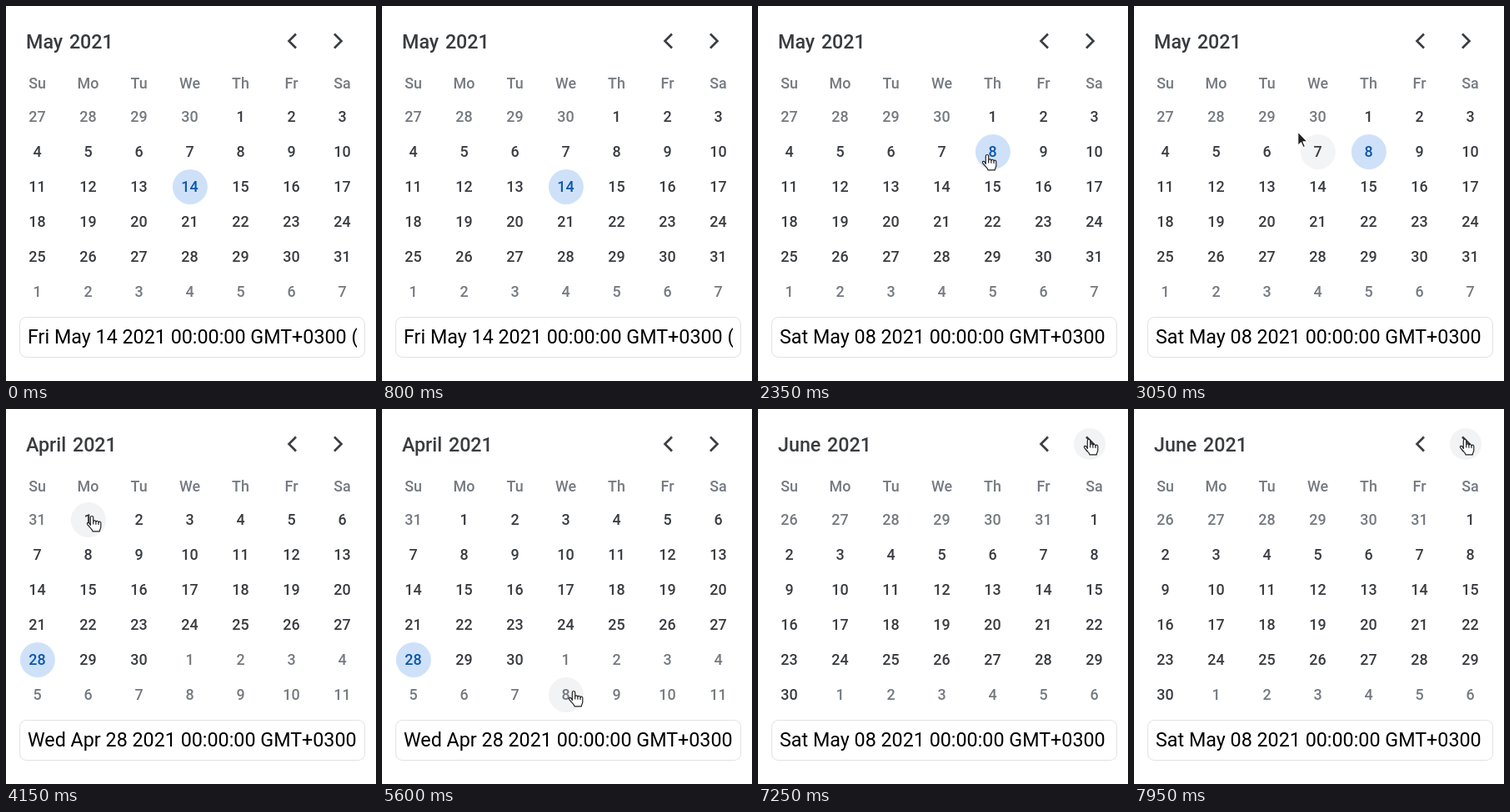
Write an HTML page with a canvas that moves like this. It is 444 px wide and 450 px high and loops after 8 s.

```html
<!DOCTYPE html>
<html lang="en">
<head>
<meta charset="utf-8">
<title>Date picker</title>
<style>
html, body { margin: 0; width: 100%; height: 100%; overflow: hidden; background: #fff; }
canvas { display: block; }
</style>
</head>
<body>
<canvas id="stage" width="444" height="450"></canvas>
<script>
const ctx = document.getElementById('stage').getContext('2d');
const LOOP = 8000, FADE = 200;
const DARK = '#393c40', GRAY = '#757a80';
const WEEKDAYS = ['Su', 'Mo', 'Tu', 'We', 'Th', 'Fr', 'Sa'];

const MONTHS = {
  April: { lead: 1, previous: 31, days: 30 },
  May: { lead: 4, previous: 30, days: 31 },
  June: { lead: 6, previous: 31, days: 30 },
};

// Each state holds from its start time until the next one.
const STATES = [
  { at: 0, month: 'May', selected: 14, value: 'Fri May 14 2021 00:00:00 GMT+0300 (' },
  { at: 1950, month: 'May', selected: 8, value: 'Sat May 08 2021 00:00:00 GMT+0300' },
  { at: 3900, month: 'April', selected: 28, value: 'Wed Apr 28 2021 00:00:00 GMT+0300' },
  { at: 5800, month: 'May', selected: 8, value: 'Sat May 08 2021 00:00:00 GMT+0300' },
  { at: 7250, month: 'June', selected: 0, value: 'Sat May 08 2021 00:00:00 GMT+0300' },
];

// Pointer path: time, x, y
const PATH = [
  [1000, 300, 419], [1250, 283, 237], [1330, 279, 196], [1450, 275, 179],
  [2600, 275, 179], [2800, 241, 170], [3030, 203, 156], [3050, 197, 151],
  [3250, 135, 135], [3450, 103, 129], [4450, 103, 129], [4800, 150, 215],
  [5150, 215, 320], [5300, 230, 339], [5950, 230, 339], [6080, 270, 240],
  [6240, 345, 108], [6450, 377, 55], [6650, 397, 37], [8000, 397, 37],
];

const HAND = new Path2D('M-1.7 10.5V1.2a1.7 1.7 0 0 1 3.4 0V6.3a1.6 1.6 0 0 1 3.2.2a1.6 1.6 0 0 1 3.1.5a1.5 1.5 0 0 1 2.8 1V12.5c0 2-1.5 3-1.5 5.3H1c0-2.3-3.5-4.3-6.2-8.2c-1.3-2 .8-3 2.1-1.6z');
const FINGERS = new Path2D('M1.7 6.3V9.5M4.9 6.5V9.7M8 7V10');
const ARROW = new Path2D('M0 0V16.5L3.8 13L6.3 18.8L8.8 17.7L6.3 12H11.5z');

const cells = Array.from({ length: 42 }, (_, i) => ({
  x: 37.5 + 61 * (i % 7), y: 133 + 42 * Math.floor(i / 7), r: 21,
}));
const buttons = [{ x: 344, y: 42, r: 19, dir: -1 }, { x: 398, y: 42, r: 19, dir: 1 }];
const hotspots = [...cells, ...buttons];

function pointerAt(t) {
  const i = PATH.findIndex(p => p[0] > t);
  if (i < 1) return null;
  const [t0, x0, y0] = PATH[i - 1], [t1, x1, y1] = PATH[i];
  const k = (t - t0) / (t1 - t0);
  return { x: x0 + (x1 - x0) * k, y: y0 + (y1 - y0) * k };
}

const inside = (p, spot) => p && Math.abs(p.x - spot.x) < spot.r && Math.abs(p.y - spot.y) < spot.r;

// Fading hover strength: share of the recent past spent over the spot.
function hoverLevel(recent, spot) {
  return recent.filter(p => inside(p, spot)).length / recent.length;
}

function disc({ x, y, r }, color, alpha = 1) {
  ctx.globalAlpha = alpha;
  ctx.fillStyle = color;
  ctx.beginPath();
  ctx.arc(x, y, r, 0, 7);
  ctx.fill();
  ctx.globalAlpha = 1;
}

function label(text, x, y, size, color, weight = 500, align = 'center') {
  ctx.font = `${weight} ${size}px Roboto, sans-serif`;
  ctx.textAlign = align;
  ctx.fillStyle = color;
  ctx.fillText(text, x, y);
}

function drawHeader(month, recent) {
  label(month, 24, 50.5, 23.3, DARK, 500, 'left');
  label('2021', 24 + ctx.measureText(month).width + 7.7, 50.5, 23.3, DARK, 500, 'left');
  for (const b of buttons) {
    disc(b, '#f2f3f4', hoverLevel(recent, b));
    ctx.strokeStyle = DARK;
    ctx.lineWidth = 2.6;
    ctx.beginPath();
    ctx.moveTo(b.x - 4 * b.dir, b.y - 8.5);
    ctx.lineTo(b.x + 4.5 * b.dir, b.y);
    ctx.lineTo(b.x - 4 * b.dir, b.y + 8.5);
    ctx.stroke();
  }
  WEEKDAYS.forEach((name, i) => label(name, cells[i].x, 99, 17.9, GRAY));
}

function drawDays({ month, selected }, recent) {
  const { lead, previous, days } = MONTHS[month];
  cells.forEach((cell, i) => {
    const n = i - lead + 1;
    const current = n > 0 && n <= days;
    const chosen = current && n === selected;
    const day = n < 1 ? previous + n : current ? n : n - days;
    const circle = { ...cell, x: cell.x + 0.4 };
    if (chosen) disc(circle, '#cee1f9');
    else disc(circle, '#f1f3f4', hoverLevel(recent, cell));
    label(day, cell.x, cell.y + 6.3, 17.9, chosen ? '#0d57aa' : current ? DARK : GRAY);
  });
}

function drawInput(value) {
  ctx.strokeStyle = '#dfe1e3';
  ctx.lineWidth = 1;
  ctx.beginPath();
  ctx.roundRect(16.5, 373.5, 414, 48, 8);
  ctx.stroke();
  ctx.save();
  ctx.beginPath();
  ctx.rect(26, 376, 395, 44);
  ctx.clip();
  label(value, 26, 405.3, 23.3, '#000', 400, 'left');
  ctx.restore();
}

function drawPointer(p) {
  if (!p) return;
  const hand = hotspots.some(spot => inside(p, spot));
  const shape = hand ? HAND : ARROW;
  ctx.save();
  ctx.translate(p.x, p.y);
  ctx.lineJoin = 'round';
  ctx.lineWidth = 1.2;
  ctx.fillStyle = hand ? '#fff' : '#222';
  ctx.strokeStyle = hand ? '#222' : '#fff';
  ctx.fill(shape);
  ctx.stroke(shape);
  if (hand) ctx.stroke(FINGERS);
  ctx.restore();
}

function draw(t) {
  const state = STATES.findLast(s => s.at <= t);
  const recent = Array.from({ length: 20 }, (_, i) => pointerAt(t - i * FADE / 20));
  ctx.fillStyle = '#fff';
  ctx.fillRect(0, 0, 444, 450);
  drawHeader(state.month, recent);
  drawDays(state, recent);
  drawInput(state.value);
  drawPointer(pointerAt(t));
}

const start = performance.now();
function tick() {
  draw((performance.now() - start) % LOOP);
  requestAnimationFrame(tick);
}
tick();
</script>
</body>
</html>
```
